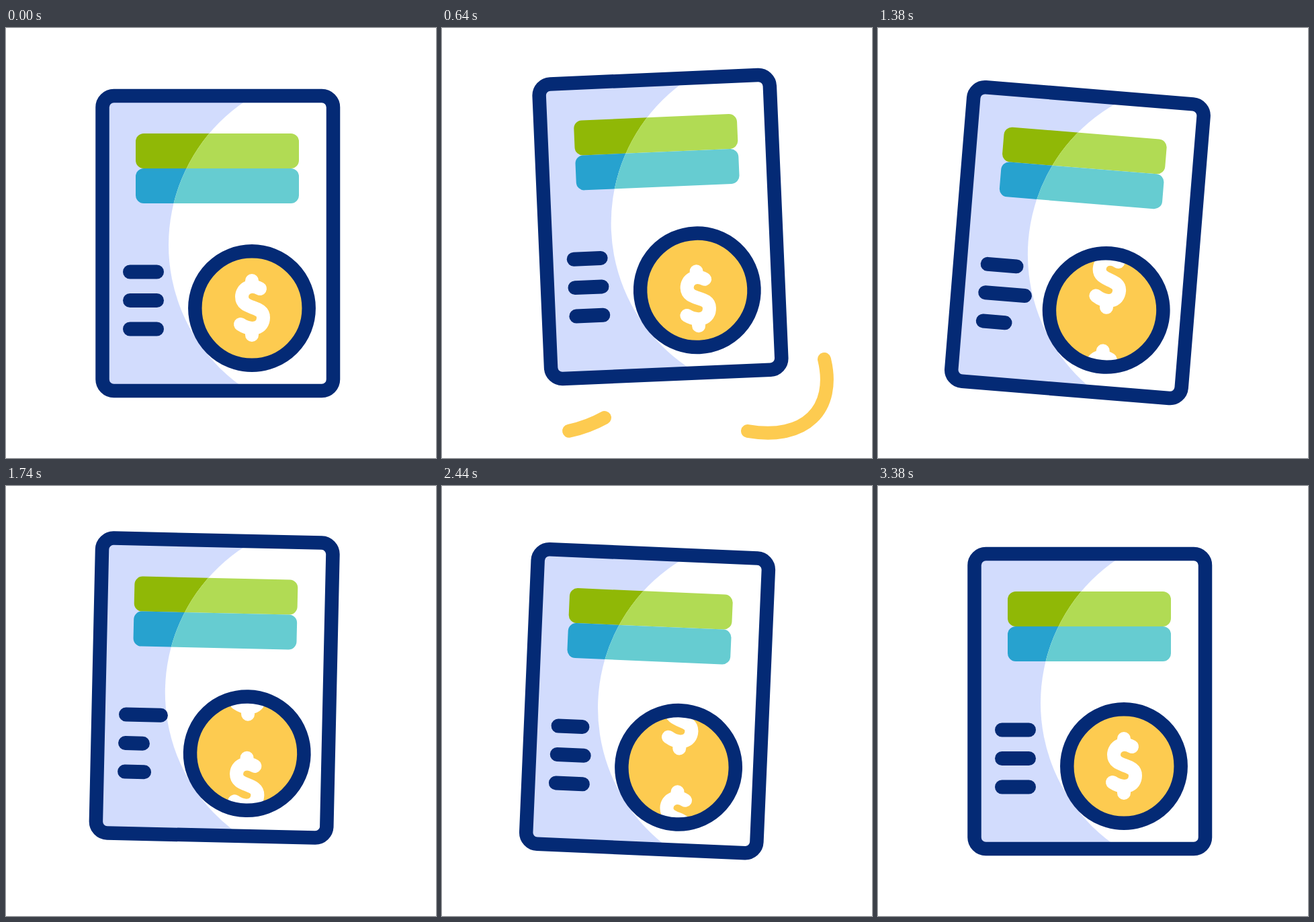
These frames come from a looping animation (640x640 px, 3.52 s). An HTML page:

```html
<!DOCTYPE html>
<html lang="en">
<head>
<meta charset="utf-8">
<title>Swinging invoice</title>
<style>
  html, body { margin: 0; width: 100%; height: 100%; overflow: hidden; background: #fff; }
  svg { display: block; width: 100%; height: 100%; }
  .outline { fill: none; stroke: #042a75; stroke-width: 20.5; }
  .round { fill: none; stroke-linecap: round; stroke-linejoin: round; }
</style>
</head>
<body>
<svg viewBox="0 0 640 640">
  <defs>
    <rect id="frame" x="143.5" y="101" width="343.5" height="439" rx="17"/>
    <clipPath id="sheet"><use href="#frame"/></clipPath>
    <clipPath id="light"><circle cx="500" cy="323" r="258"/></clipPath>
    <clipPath id="face"><circle r="80"/></clipPath>
    <rect id="bar" x="193" width="243" height="52" rx="12"/>
    <path id="dollar" class="round" stroke="#fff" stroke-width="20"
      d="M12-29C-2-37-15-29-15-17C-15 3 17-5 17 14C17 30 0 35-17 24M0-41V-34M0 34V40"/>
  </defs>

  <g class="round" stroke="#fdcb50" stroke-width="20">
    <path id="rightArc" pathLength="1" d="M455 600C541 615 587 567 569 493"/>
    <path id="leftArc" pathLength="1" d="M242 580Q217 594 188 600C125 612 85 580 75 522"/>
  </g>

  <g id="card">
    <g clip-path="url(#sheet)">
      <use href="#frame" fill="#d2dcfd"/>
      <use href="#bar" y="157" fill="#90b806"/>
      <use href="#bar" y="209" fill="#27a2cf"/>
      <g clip-path="url(#light)">
        <use href="#frame" fill="#fff"/>
        <use href="#bar" y="157" fill="#b1db54"/>
        <use href="#bar" y="209" fill="#66ccd1"/>
      </g>
    </g>
    <use href="#frame" class="outline"/>
    <g id="lines" fill="#042a75">
      <rect x="174" y="352.5" height="21" rx="10.5"/>
      <rect x="174" y="395" height="21" rx="10.5"/>
      <rect x="174" y="437.5" height="21" rx="10.5"/>
    </g>
    <g transform="translate(366 417)">
      <circle r="84.7" fill="#fdcb50"/>
      <g clip-path="url(#face)">
        <g id="reel">
          <use href="#dollar"/>
          <use href="#dollar" y="146"/>
        </g>
      </g>
      <circle class="outline" r="84.7"/>
    </g>
  </g>
</svg>
<script>
const LOOP = 3520, REEL_STEP = 146;
const $ = id => document.getElementById(id);

// Turning points as [time, value]
const SWING = [[445, 0], [890, -6], [1510, 6], [2050, -6], [2660, 6], [2820, 5], [3160, -7.2], [3380, 0]];
const SCROLL = [[220, 0], [640, 13], [940, -12], [1380, -44], [2100, -158], [2820, -268], [3380, -2 * REEL_STEP]];
const STRETCH = [[0, 61], [260, 82], [760, 45], [1300, 61]];

const progress = (t, from, to) => Math.min(Math.max((t - from) / (to - from), 0), 1);
const ease = (t, from, to) => {
  const x = progress(t, from, to);
  return x * x * (3 - 2 * x);
};

// Smooth curve through the points, flat at peaks and ends
function slope(keys, i) {
  const a = keys[i - 1], b = keys[i], c = keys[i + 1];
  if (!a || !c || (b[1] - a[1]) * (c[1] - b[1]) <= 0) return 0;
  return (c[1] - a[1]) / (c[0] - a[0]);
}

function curve(keys, t) {
  const next = keys.findIndex(k => k[0] > t);
  if (next === 0) return keys[0][1];
  if (next < 0) return keys[keys.length - 1][1];
  const i = next - 1, [t0, v0] = keys[i], [t1, v1] = keys[next];
  const x = progress(t, t0, t1), y = 1 - x, e = ease(t, t0, t1);
  return v0 + (v1 - v0) * e
    + (t1 - t0) * x * y * (slope(keys, i) * y - slope(keys, next) * x);
}

// Quick push upwards, then a free fall
const hop = (t, peak, fall, height) =>
  height * ease(t, peak - 250, peak) * (1 - progress(t, peak, peak + fall) ** 2);

function trim(path, tail, head) {
  path.style.visibility = head - tail > 0.001 ? "visible" : "hidden";
  path.setAttribute("stroke-dasharray", `${Math.max(head - tail, 0)} 3`);
  path.setAttribute("stroke-dashoffset", -tail);
}

function draw(t) {
  const lift = hop(t, 680, 570, 26) + hop(t, 1820, 570, 26) + hop(t, 3130, 250, 50);
  $("card").setAttribute("transform", `translate(0 ${-lift}) rotate(${curve(SWING, t)} 317 95)`);
  $("reel").setAttribute("transform", `translate(0 ${curve(SCROLL, t) % REEL_STEP})`);

  // The lowest line starts first
  [...$("lines").children].forEach((line, i) =>
    line.setAttribute("width", curve(STRETCH, t - 1320 + 270 * i)));

  trim($("rightArc"), ease(t, 640, 880), ease(t, 460, 640));
  trim($("leftArc"), ease(t, 640, 1010), ease(t, 560, 800));
}

function tick() {
  draw(performance.now() % LOOP);
  requestAnimationFrame(tick);
}
tick();
</script>
</body>
</html>
```
